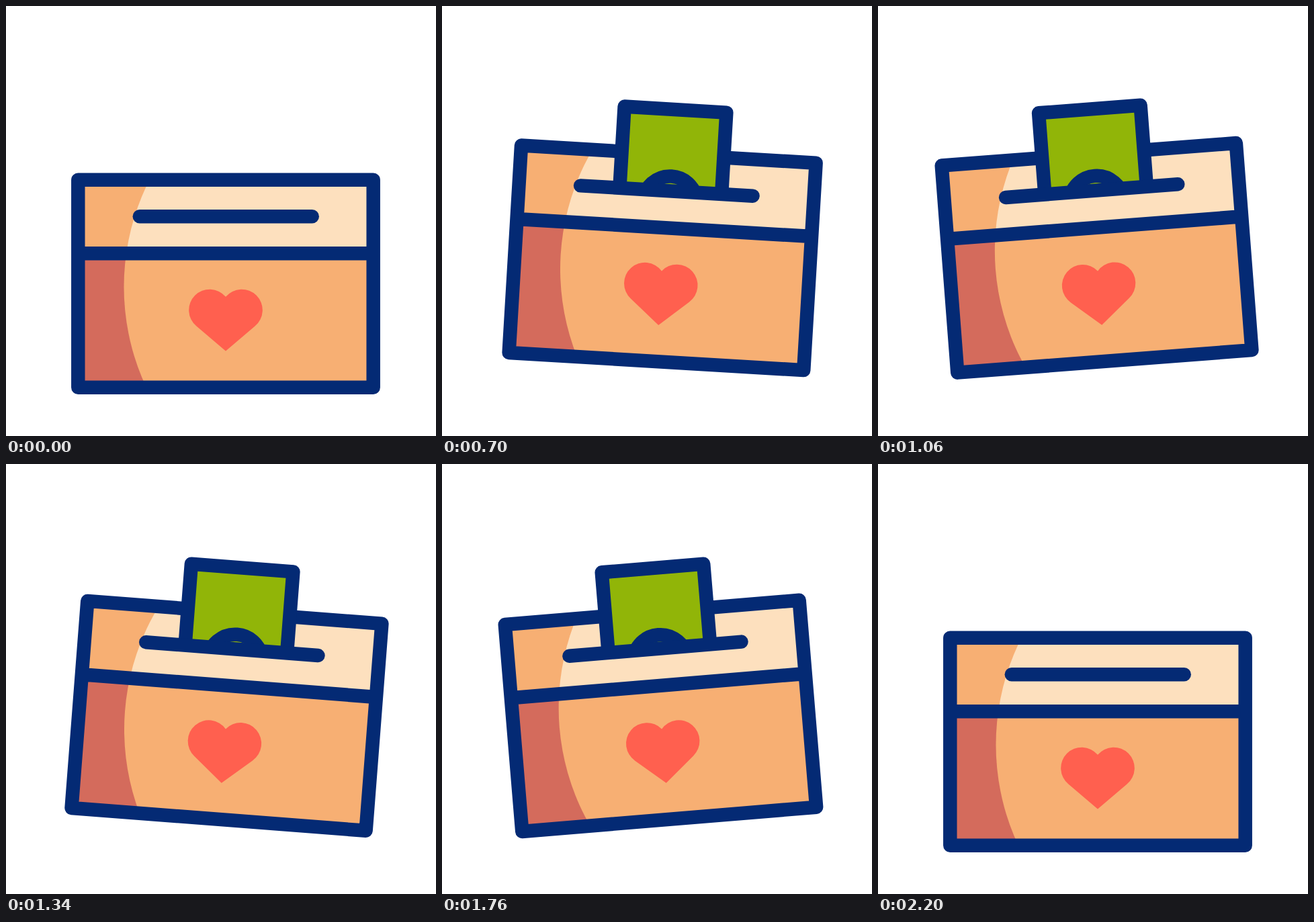
An HTML page that plays this animation: 640x640 px, repeating every 3120 ms.

```html
<!DOCTYPE html>
<html lang="en">
<head>
<meta charset="utf-8">
<title>Donation box</title>
<style>
  html, body { margin: 0; height: 100%; overflow: hidden; background: #fff; }
  svg { display: block; width: 100%; height: 100%; }
  .line { fill: none; stroke: #042a74; stroke-width: 20.48; stroke-linecap: round; stroke-linejoin: round; }
</style>
</head>
<body>
<svg viewBox="0 0 640 640">
  <defs>
    <clipPath id="aboveSlot"><path d="M0-200H640V313.2H0Z"/></clipPath>
    <clipPath id="lit"><circle cx="528.5" cy="418" r="353"/></clipPath>
  </defs>
  <g id="box">
    <path fill="#f7af73" d="M107.3 258.7H546.7V368.3H107.3Z"/>
    <path fill="#d46b5c" d="M107.3 368.3H546.7V567.7H107.3Z"/>
    <g clip-path="url(#lit)">
      <path fill="#fde0be" d="M107.3 258.7H546.7V368.3H107.3Z"/>
      <path fill="#f7af73" d="M107.3 368.3H546.7V567.7H107.3Z"/>
    </g>
    <path class="line" d="M107.3 258.7H546.7V567.7H107.3ZM107.3 368.3H546.7"/>
    <path fill="#ff604f" d="M327 513.5L283.5 476.6A31 31 0 1 1 327 432.8A31 31 0 1 1 370.5 476.6Z"/>
    <g clip-path="url(#aboveSlot)">
      <g id="note">
        <rect class="line" style="fill:#91b508" x="257.2" y="191.7" width="152" height="280"/>
        <circle class="line" cx="333.2" cy="331.6" r="40.3"/>
      </g>
    </g>
    <path class="line" d="M198.8 313.2H455.7"/>
  </g>
</svg>
<script>
const LOOP = 3120, START = 200, END = 2200, SWING = 400, SLIDE = 500;
const ANGLE = 5, LIFT = 38.4, DEPTH = 188;
const box = document.getElementById('box');
const note = document.getElementById('note');

const clamp = x => Math.max(0, Math.min(1, x));
const smooth = x => x * x * (3 - 2 * x);

// cubic-bezier(.333, 0, .15, 1)
function settle(x) {
  x = clamp(x);
  let lo = 0, hi = 1;
  for (let i = 0; i < 30; i++) {
    const v = (lo + hi) / 2, u = 1 - v;
    if (u * u * v + 0.45 * u * v * v + v * v * v < x) lo = v; else hi = v;
  }
  return smooth(lo);
}

function tilt(t, edge) {
  const step = (t - START) / SWING;
  if (step <= 1) return ANGLE * settle(edge / SWING);
  if (step >= 4) return -ANGLE * settle(edge / SWING);
  const n = Math.floor(step);
  const from = n % 2 ? ANGLE : -ANGLE;
  return from * (1 - 2 * smooth(step - n));
}

function draw(now) {
  const t = now % LOOP;
  const edge = Math.min(t - START, END - t); // the way out mirrors the way in
  const lift = LIFT * settle(edge / SWING);
  const sunk = DEPTH * (1 - settle(edge / SLIDE));
  box.setAttribute('transform', `translate(0 ${-lift}) rotate(${tilt(t, edge)} 327 432)`);
  note.setAttribute('transform', `translate(0 ${sunk})`);
}

const origin = performance.now();
function frame() {
  draw(performance.now() - origin);
  requestAnimationFrame(frame);
}
frame();
</script>
</body>
</html>
```
